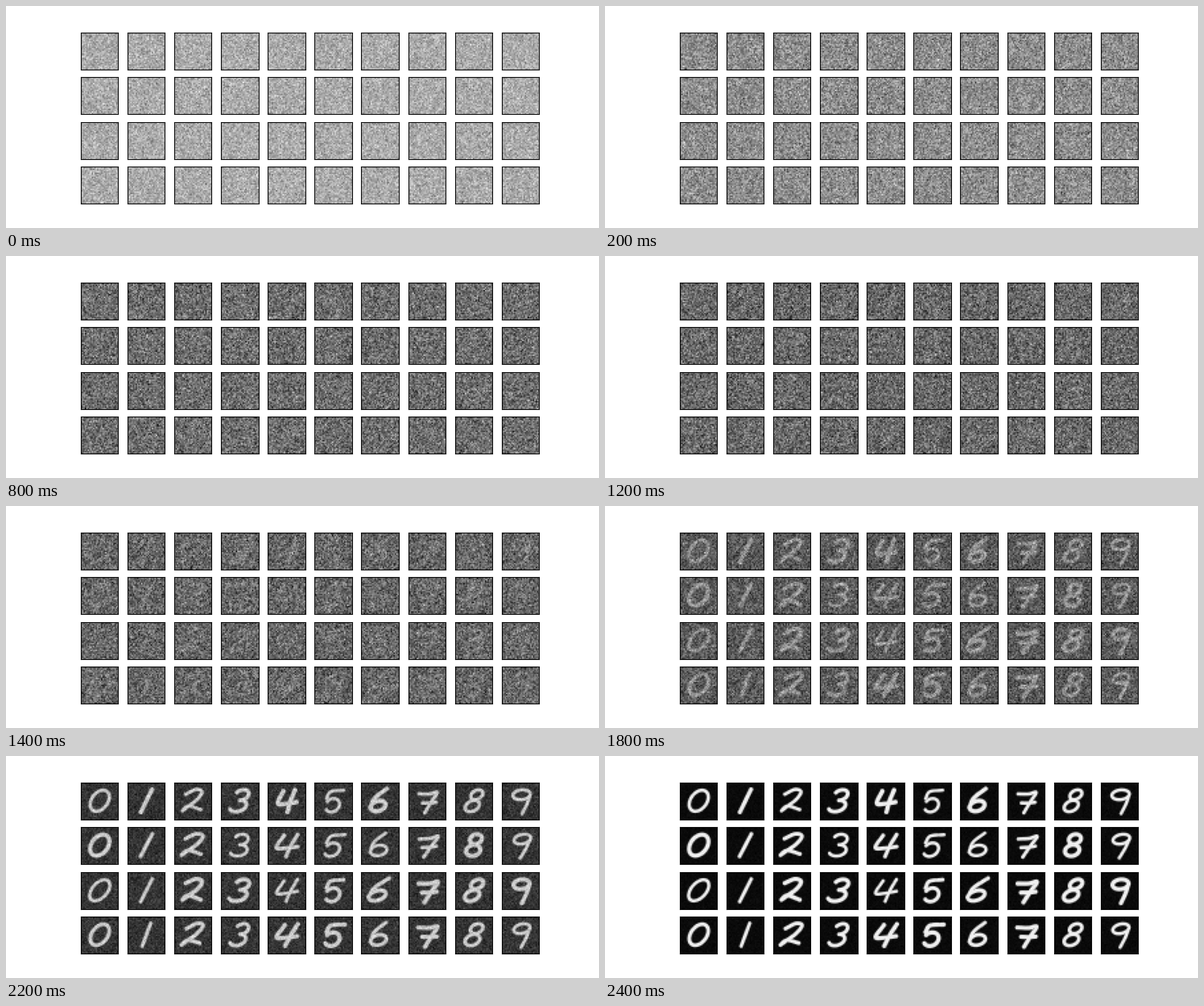
A matplotlib script that plays this animation: 800x300 px, repeating every 2600 ms.

```python
import numpy as np
import matplotlib.pyplot as plt
from matplotlib.animation import FuncAnimation

ROWS, COLS, GRID = 4, 10, 28
FRAMES, INTERVAL = 13, 200
SIDE = 50.2  # side of a tile in screen pixels

rng = np.random.default_rng(7)
centres = (np.arange(GRID) + 0.5) * SIDE / GRID - SIDE / 2
grid_x, grid_y = np.meshgrid(centres, centres)


def arc(x, y, rx, ry, start=0, stop=360):
    """Part of an ellipse; angles run clockwise from the right."""
    angle = np.radians(np.linspace(start, stop, 60))
    return np.column_stack([x + rx * np.cos(angle), y + ry * np.sin(angle)])


def curve(*points, steps=10):
    """Catmull-Rom curve through the points."""
    p = np.array(points, float)
    p = np.vstack([2 * p[0] - p[1], p, 2 * p[-1] - p[-2]])
    t = np.linspace(0, 1, steps)[:, None]
    parts = [0.5 * (2 * b + (c - a) * t + (2 * a - 5 * b + 4 * c - d) * t**2
                    + (3 * b - a - 3 * c + d) * t**3)
             for a, b, c, d in zip(p, p[1:], p[2:], p[3:])]
    return np.vstack(parts)


# Upright pen strokes for 0 to 9, in pixels around the middle of a tile
GLYPHS = [
    [arc(0, 0, 12, 14)],
    [curve((3, -15), (0, 0), (-3, 15))],
    [curve((-12, -9), (-1, -15), (8, -12), (5, -2), (-5, 8), (-10, 13), (-4, 7), (13, 12))],
    [arc(0, -7.5, 9, 7, -150, 90), arc(0, 7, 11, 7.5, -90, 150)],
    [curve((-8, -13), (-12, 3), (0, 4), (15, 2)), curve((9, -14), (6, 0), (5, 15))],
    [curve((12, -14), (-6, -12), (-10, -3)), arc(0, 6, 10, 9, -145, 140)],
    [curve((4, -16), (-9, -4), (-11, 9)), arc(0, 7, 11, 7)],
    [curve((-15, -9), (0, -9), (10, -11), (6, 2), (2, 16)), curve((-6, 3), (4, 3), (13, 2))],
    [arc(1, -8, 8, 6.5), arc(0, 7, 9.5, 7.5)],
    [arc(-1, -8, 11, 6.5), curve((10, -9), (9, 4), (6, 17))],
]


def write(strokes):
    """Ink one digit with a slightly different hand each time."""
    slant, turn = rng.normal(0.33, 0.08), rng.normal(0, 0.04)
    stretch, radius = rng.normal(1, 0.05), rng.uniform(2.1, 3.0)
    ink = np.zeros((GRID, GRID))
    for x, y in (stroke.T for stroke in strokes):
        pen_x = stretch * x - slant * y
        pen_y = y + turn * x
        gap = np.hypot(grid_x[..., None] - pen_x, grid_y[..., None] - pen_y).min(axis=-1)
        ink = np.maximum(ink, np.clip((radius - gap) / 1.8 + 0.5, 0, 1))
    return ink


digits = np.array([[write(strokes) for strokes in GLYPHS] for _ in range(ROWS)])

# Noise that drifts from step to step
DRIFT = 0.7
grain = [rng.standard_normal(digits.shape)]
for _ in range(FRAMES - 1):
    fresh = rng.standard_normal(digits.shape)
    grain.append(DRIFT * grain[-1] + np.sqrt(1 - DRIFT**2) * fresh)

fig, axes = plt.subplots(ROWS, COLS, figsize=(8, 3), dpi=100)
images = []
for ax in axes.flat:
    ax.set(xticks=[], yticks=[])
    images.append(ax.imshow(np.zeros((GRID, GRID)), cmap="gray", vmin=0, vmax=1))


def update(step):
    t = step / (FRAMES - 1)
    paper = (0.40 + 0.27 * np.exp(-step / 1.8)) * (1 - 0.9 * t**7)
    contrast = 0.9 * t**4.7
    noise = 0.125 * (1 - 0.28 * np.exp(-step)) * (1 - 0.9 * t**5)
    tiles = paper + contrast * digits + noise * grain[step]
    for image, tile in zip(images, tiles.reshape(-1, GRID, GRID)):
        image.set_data(np.clip(tile, 0, 1))
    return images


animation = FuncAnimation(fig, update, frames=FRAMES, interval=INTERVAL, repeat=True, repeat_delay=0)
plt.show()
```
